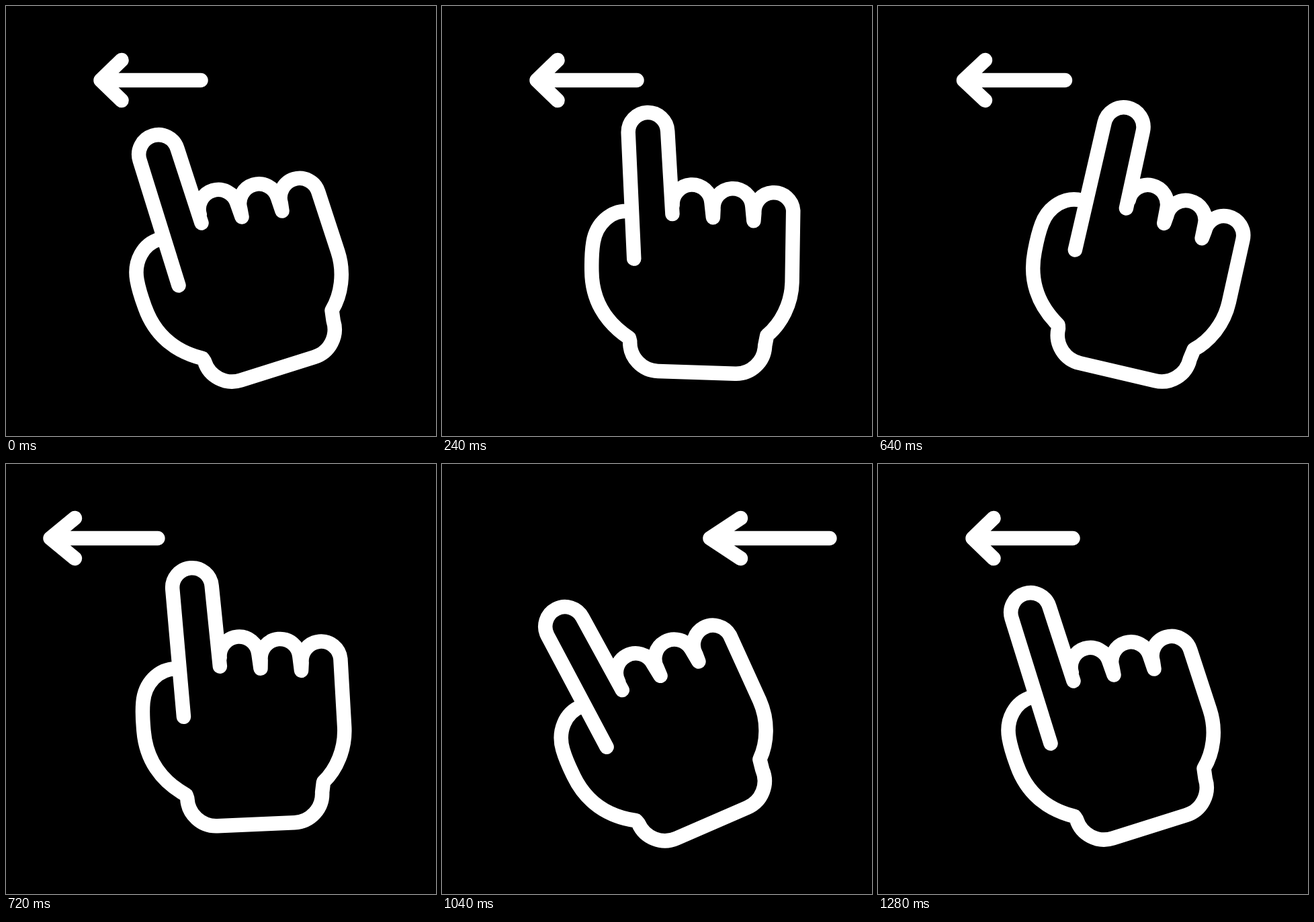
These frames come from a looping animation (640x640 px, 1.48 s). An HTML page:

```html
<!DOCTYPE html>
<html lang="en">
<head>
<meta charset="utf-8">
<title>Swipe left</title>
<style>
  html, body { margin: 0; width: 100%; height: 100%; overflow: hidden; background: #000; }
  svg { display: block; width: 100%; height: 100%; }
  path { fill: none; stroke: #fff; stroke-width: 21.5; stroke-linecap: round; stroke-linejoin: round; }
</style>
</head>
<body>
<svg viewBox="0 0 640 640">
  <path id="arrow"/>
  <path id="hand"/>
</svg>
<script>
const LOOP = 1480, STEP = 40;
const SWIPE = 600, HANDOVER = 880, END = 1280;

// Hand turned by angle around the wrist at x, y; bend curls the fingers
const REST = { angle: 0, x: 295, y: 523, bend: 0 };
const BACK = { angle: 33, x: 271.6, y: 472.4, bend: 0 };
const FLICK = { angle: -8, x: 290, y: 531, bend: 1 };

const arrow = document.getElementById('arrow');
const hand = document.getElementById('hand');
const rad = deg => deg * Math.PI / 180;
const mix = (a, b, p) => a + (b - a) * p;

function ease(t, from, to) {
  const p = Math.min(1, Math.max(0, (t - from) / (to - from)));
  return (1 - Math.cos(Math.PI * p)) / 2;
}

// Blend of two poses, with an extra bulge halfway
function blend(a, b, p, bulge) {
  const pose = {};
  for (const key in a) pose[key] = mix(a[key], b[key], p) + (bulge[key] || 0) * Math.sin(Math.PI * p);
  return pose;
}

function poseAt(t) {
  if (t < SWIPE) return blend(REST, BACK, ease(t, 40, 400), { bend: .78 });
  if (t < HANDOVER) return blend(BACK, FLICK, ease(t, SWIPE, 860), { x: -9, y: -6.5 });
  return blend(FLICK, REST, ease(t, 920, END), {});
}

const pt = ([x, y]) => x.toFixed(2) + ' ' + y.toFixed(2);

// Both ends of a half-round fingertip
function ends([x, y], deg, r) {
  const dx = r * Math.cos(rad(deg)), dy = r * Math.sin(rad(deg));
  return [pt([x - dx, y - dy]), pt([x + dx, y + dy])];
}

function handPath(bend) {
  const twist = -8 * bend, cos = Math.cos(rad(twist)), sin = Math.sin(rad(twist));
  const turn = (x, y) => {
    const dx = x - 351, dy = y - 314;
    return [351 + dx * cos - dy * sin, 314 + dx * sin + dy * cos];
  };
  const knuckle = i => pt(turn(291 + 60 * i, 323 - 9 * i));
  const arch = i => ends(turn(316 + 60.5 * i, 302 - 8.5 * i), -17 + twist, 29);

  // Pointing finger
  const [left, right] = ends([227 - 12.8 * bend, 221 + 6.9 * bend], -17.4 - 5.7 * bend, 29.3);
  let d = `M${pt([257 + 4.5 * bend, 416 - 6.7 * bend])}L${left}A29.3 29.3 0 0 1 ${right}L${knuckle(0)}`;

  // Thumb, wrist and outer edge
  d += 'M229 347C204 354 190 380 195 408C198 425 203 438 207 449C221 488 250 514 292.5 524.5'
    + 'L295.5 529A43 43 0 0 0 349.5 557L459 522.5A43 43 0 0 0 487.2 468.5L485 453C499 430 504 397 494 366';

  // Folded fingers
  for (let i = 2; i >= 0; i--) {
    const [l, r] = arch(i);
    d += `L${r}A29 29 0 0 0 ${l}`;
    if (i) d += `L${knuckle(i)}`;
  }
  return d;
}

// Arrow moved by dx from its resting place, stretched with the distance
function arrowPath(dx, stretch) {
  const x = 141 + dx, extra = Math.abs(dx) * stretch;
  const head = x + 31 + extra / 2, tail = x + 149 + extra;
  return `M${head} 80.5L${x} 110.5L${head} 140.5M${x} 110.5H${tail}`;
}

// One arrow speeds up to the left, the next slows down from the right
function arrowsAt(t) {
  const gone = Math.max(0, t - SWIPE), left = Math.max(0, END - t);
  return arrowPath(-75 * (gone / 120) ** 1.56, .145)
    + arrowPath(258 * (left / 240) ** 1.24, .112);
}

function draw(time) {
  const t = Math.floor((time % LOOP) / STEP) * STEP;
  const { angle, x, y, bend } = poseAt(t);
  hand.setAttribute('d', handPath(bend));
  hand.setAttribute('transform', `translate(${x} ${y}) rotate(${angle}) translate(${-REST.x} ${-REST.y})`);
  arrow.setAttribute('d', arrowsAt(t));
}

const start = performance.now();
function tick() {
  draw(performance.now() - start);
  requestAnimationFrame(tick);
}
tick();
</script>
</body>
</html>
```
